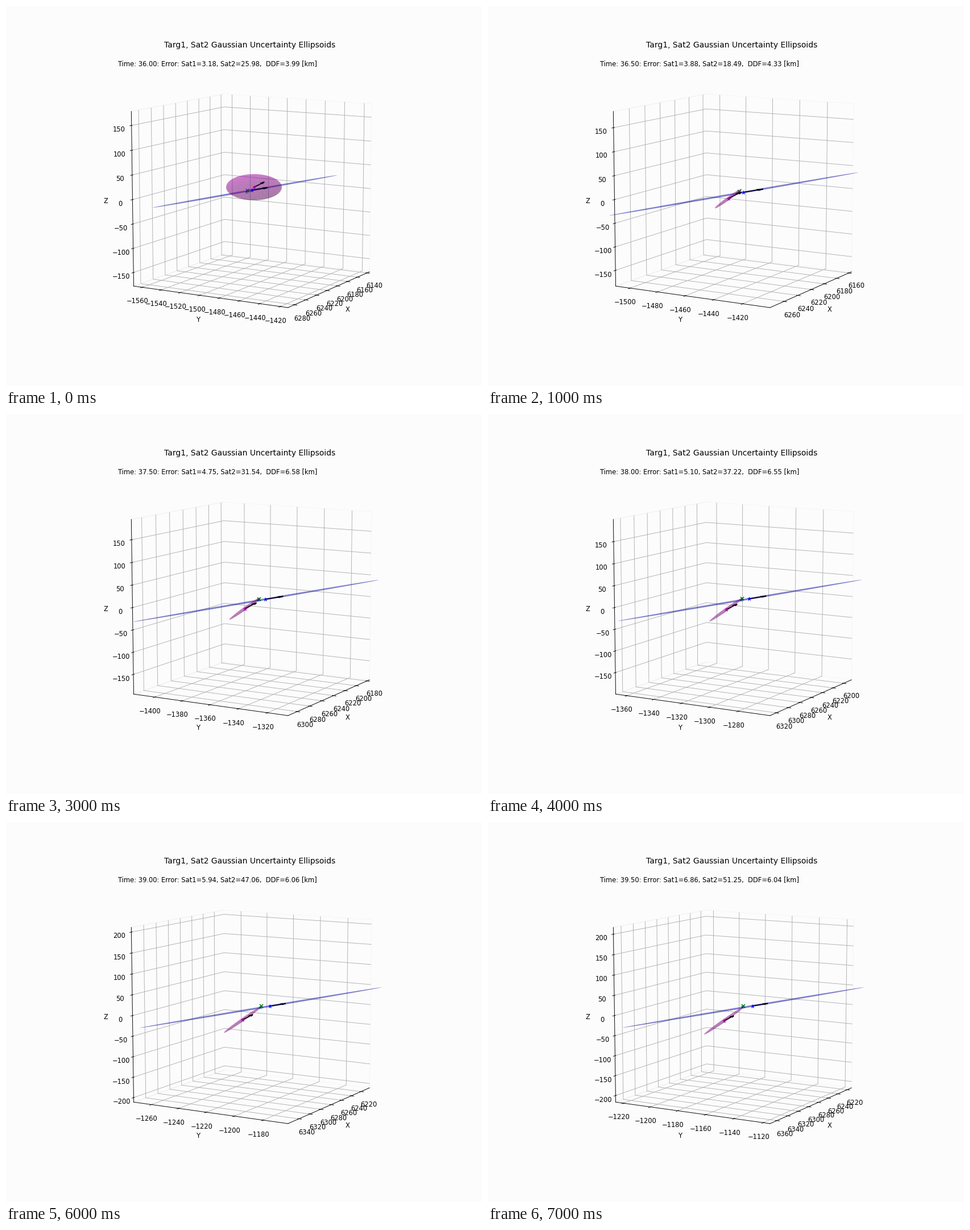
These frames come from a looping animation (837x669 px, 8 s). A matplotlib script:

```python
import numpy as np
import matplotlib.pyplot as plt
from matplotlib.animation import FuncAnimation

BG = "#fcfcfc"
ELEV, AZIM = 10, 30
CENTER = np.array([435.9, 330.9])   # pixel where the middle of the box lands
EDGE = 306.4                        # pixels per box edge
STEPS = 8

# Ellipsoid centres and half axes, and the true position, in pixels.
FIRST = dict(mid1=(420, 326.5), half1=(162, -28.5),
             mid2=(436, 319), half2=(49, 0), truth=(425, 325.5))
THIN = dict(mid1=(432, 331), half1=(219, -38),
            mid2=(422.5, 339), half2=(23.5, -17), truth=(442, 327))
LAST = dict(mid1=(449, 326.5), half1=(212, -35.5),
            mid2=(414.5, 350), half2=(34.5, -24), truth=(449, 324))

# Velocities in pixels for a box that is 124 km wide.
VEL1, VEL2 = np.array([35, -5.7]), np.array([23, -11.5])

# Error read-outs in km, one per step.
SAT1_ERR = [3.18, 3.88, 4.35, 4.75, 5.10, 5.44, 5.94, 6.86]
SAT2_ERR = [25.98, 18.49, 25.21, 31.54, 37.22, 42.45, 47.06, 51.25]
DDF_ERR = [3.99, 4.33, 5.62, 6.58, 6.55, 6.40, 6.06, 6.04]

e, a = np.radians([ELEV, AZIM])
RIGHT = np.array([-np.sin(a), np.cos(a), 0])
UP = np.array([-np.sin(e) * np.cos(a), -np.sin(e) * np.sin(a), np.cos(e)])
EYE = np.cross(RIGHT, UP)

fig = plt.figure(figsize=(10.0845, 8.0603), dpi=83, facecolor=BG)
ax = fig.add_subplot(projection="3d", computed_zorder=False)
ax.set_facecolor(BG)
ax.set_box_aspect((1, 1, 1))
ax.view_init(ELEV, AZIM)
ax.set(xlabel="X", ylabel="Y", zlabel="Z")
ax.set_title("Targ1, Sat2 Gaussian Uncertainty Ellipsoids")
for axis in (ax.xaxis, ax.yaxis, ax.zaxis):
    axis.pane.set_fill(False)
caption = ax.text2D(0.05, 0.95, "", transform=ax.transAxes)
drawn = []


def box(i):
    """Middle and span of the axes: they follow the target on its orbit."""
    z_span = 2 * (178.2 + 5.49 * i)
    if i == 0:
        return np.array([6212.9, -1490.8, 0]), np.array([156.7, 156.5, z_span])
    k = i - 1
    x_span = 124.2 + 8 * k - 0.28 * k * k
    x_min = 6155.6 + 10.2 * k - 0.18 * k * k
    middle = np.array([x_min + x_span / 2, -1456.1 + 47.58 * k, 0])
    return middle, np.array([x_span, 109.3 + 0.2 * k, z_span])


def pose(i):
    """Jump from the wide first estimate, then drift to the last one."""
    if i == 0:
        return {name: np.array(p) for name, p in FIRST.items()}
    s = (i - 1) / (STEPS - 2)
    eased = 1 - (1 - s) ** 1.5
    out = {}
    for name in THIN:
        p, q = np.array(THIN[name]), np.array(LAST[name])
        out[name] = p + (q - p) * (s if name.endswith("2") else eased)
    return out


def ticks(lo, hi, step):
    """Multiples of step that lie inside the box margin."""
    pad = (hi - lo) / 50
    first, last = np.ceil((lo + pad) / step), np.floor((hi - pad) / step)
    return np.arange(first, last + 1) * step


def draw_step(i):
    for artist in drawn:
        artist.remove()
    drawn.clear()

    middle, span = box(i)
    at = pose(i)

    def vector(px, py, depth=0):
        """Pixel offset on the plane facing the viewer, in data units."""
        return (px * RIGHT - py * UP + depth * EYE) / EDGE * span

    def point(p):
        return middle + vector(*(p - CENTER))

    def ellipsoid(mid, half, width, depth, color, n, z):
        side = np.array([half[1], -half[0]]) / np.hypot(*half) * width
        u = np.linspace(0, 2 * np.pi, n)[:, None]
        v = np.linspace(0, np.pi, 25)[None, :]
        ball = np.array([np.cos(v) + 0 * u,
                         np.sin(v) * np.cos(u), np.sin(v) * np.sin(u)])
        axes = np.array([vector(*half), vector(*side), vector(0, 0, depth)])
        xyz = np.einsum("kc,kij->cij", axes, ball)
        xyz += point(mid)[:, None, None]
        drawn.append(ax.plot_surface(*xyz, color=color, alpha=0.3, rstride=1,
                                     cstride=1, linewidth=0, zorder=z))

    def mark(p, style, color, size, z):
        x, y, h = point(p)
        drawn.extend(ax.plot([x], [y], [h], style, color=color, ms=size,
                             mew=1.4 if style == "x" else 0.5, zorder=z))

    def arrow(p, d, color):
        drawn.append(ax.quiver(*point(p), *vector(*d), color=color,
                               arrow_length_ratio=0.3, linewidth=1.5,
                               zorder=6))

    est1 = at["mid1"] + 0.076 * at["half1"]
    est2 = at["mid2"]
    zoom = 124 / span[0]
    width, depth, facets = (23, 45, 25) if i == 0 else (2.8, 2.8, 13)

    mark(at["truth"] + [-1.8, 1.5], "*", "c", 6, 2.4)
    mark(at["truth"], "x", "g", 4.5, 2.5)
    ellipsoid(at["mid1"], at["half1"], 1.5, 1.5, "b", 9, 3)
    ellipsoid(est2, at["half2"], width, depth, "m", facets, 4)
    arrow(est1, VEL1 * zoom, "#00001c")
    arrow(est2, VEL2 * zoom, "#1c001c")
    mark(est1, "*", "b", 6, 7)
    mark(est2, "*", "#a000a0", 6, 7)

    lows, highs = middle - span / 2, middle + span / 2
    for name, lo, hi, step in zip("xyz", lows, highs, (20, 20, 50)):
        ax.set(**{name + "ticks": ticks(lo, hi, step)})
        ax.set(**{name + "lim": (lo, hi)})

    caption.set_text(f"Time: {36 + i / 2:.2f}: Error: "
                     f"Sat1={SAT1_ERR[i]:.2f}, Sat2={SAT2_ERR[i]:.2f},  "
                     f"DDF={DDF_ERR[i]:.2f} [km]")
    return drawn


anim = FuncAnimation(fig, draw_step, frames=STEPS, interval=1000, repeat=True,
                     repeat_delay=0, init_func=lambda: [])
plt.show()
```
